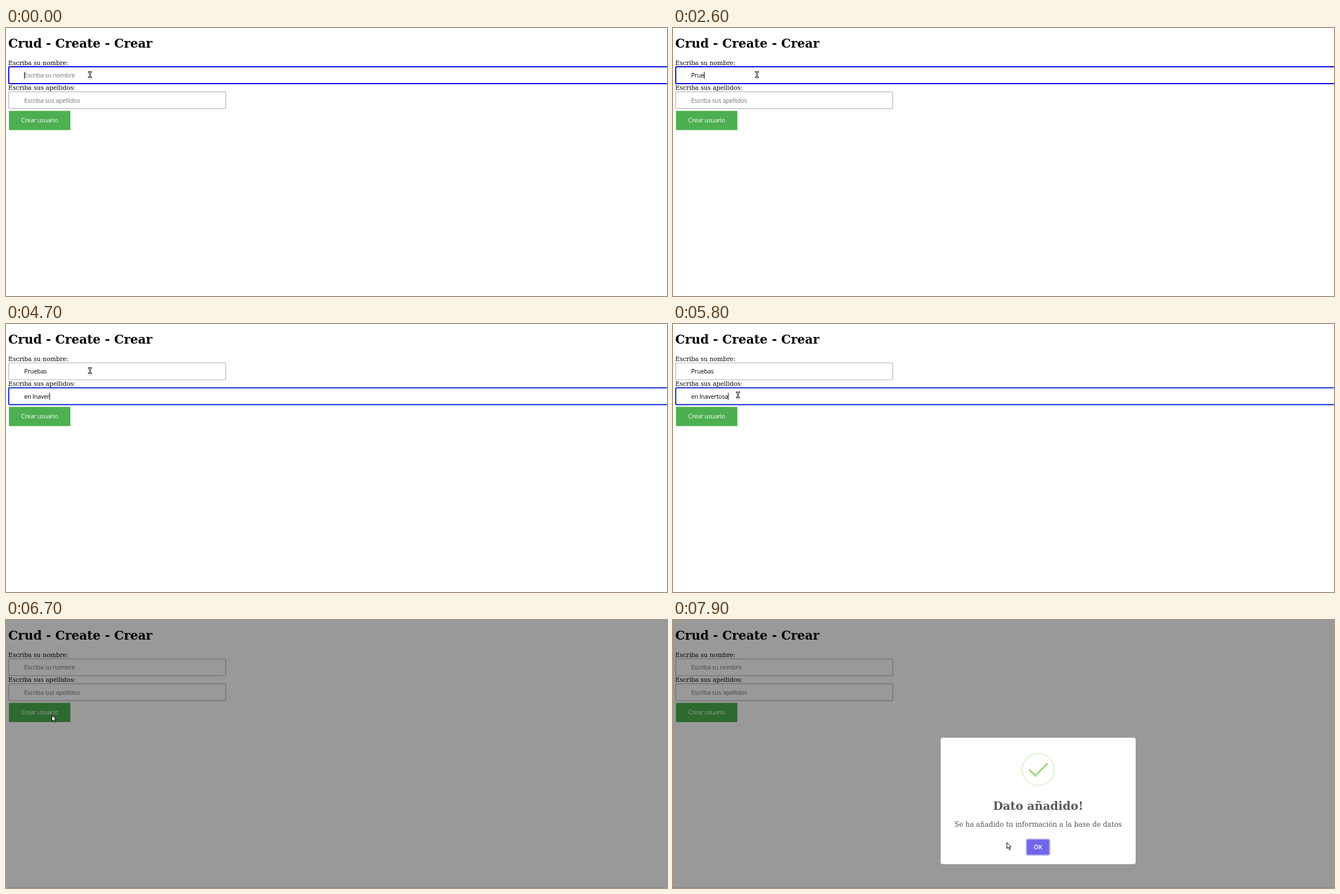
Write an HTML page that moves like this. It is 1173x477 px and loops after 8 s.

```html
<!DOCTYPE html>
<html lang="es">
<head>
<meta charset="utf-8">
<title>Crud - Create - Crear</title>
<style>
  html, body { margin: 0; width: 100%; height: 100%; overflow: hidden; background: #fff; }
  svg { display: block; width: 100vw; height: 100vh; }
  text { font: 10.83px "DejaVu Serif", serif; white-space: pre; }
  .ui { font-family: "Open Sans", "Noto Sans", sans-serif; letter-spacing: -.24px; }
  .mid { text-anchor: middle; }
  #popup { filter: drop-shadow(0 1.5px 1.5px rgba(0, 0, 0, .55)); }
  #popup text { font: 8.4px "DejaVu Sans", sans-serif; }
</style>
</head>
<body>
<svg viewBox="0 0 1173 477">
  <rect width="1173" height="477" fill="#fff"/>
  <text x="4" y="35" style="font-size:21.67px;font-weight:bold">Crud - Create - Crear</text>
  <text x="4" y="65.6">Escriba su nombre:</text>
  <text x="4" y="110.2">Escriba sus apellidos:</text>
  <g id="fields"></g>
  <rect id="button"/>
  <text class="ui" x="27" y="168" fill="#fff">Crear usuario</text>
  <g id="popup">
    <rect x="4.5" y="100" width="1300" height="15" fill="#fff" stroke="#c4c4c4" stroke-width=".7"/>
    <text x="8.6" y="110.6">Perulo</text>
  </g>
  <g id="shade">
    <rect width="1173" height="477" opacity=".4"/>
    <rect y="476" width="1173" height="1" opacity=".1"/>
  </g>
  <g id="modal">
    <rect x="475" y="209.5" width="346" height="225" rx="3.4" fill="#fff"/>
    <circle cx="648" cy="266" r="28.5" fill="none" stroke="#e4f5db" stroke-width="2.7"/>
    <g fill="none" stroke="#a5dc86" stroke-width="3.4" stroke-linecap="round">
      <path id="tip"/>
      <path id="long"/>
    </g>
    <text class="mid" x="648" y="338.4" fill="#595959" style="font-size:20.3px;font-weight:bold">Dato añadido!</text>
    <text class="mid" x="648" y="367.6" fill="#545454" style="font-size:12.19px">Se ha añadido tu información a la base de datos</text>
    <rect x="626" y="389" width="43.5" height="30.5" rx="4" fill="#b8b3f0"/>
    <rect x="628" y="391" width="39.5" height="26.5" rx="2.7" fill="#7066e8"/>
    <text class="ui mid" x="648" y="408.2" fill="#fff" style="font-weight:600;letter-spacing:0">OK</text>
  </g>
  <g id="cursor" stroke="#000" stroke-linejoin="round">
    <path id="beam" fill="#fff" stroke-width=".9" d="M-3-5.5h2.4l.6.6.6-.6H3v1.6H1V3.9h2v1.6H.6L0 4.9l-.6.6H-3V3.9h2v-7.8h-2z"/>
    <path id="hand" fill="#fff" stroke-width="1" d="M0 .8Q0-.3 1-.3T2 .8V4.6l4.4.7Q7.6 5.6 7.5 7L6.8 9.6V11.6H1V9.8L-2.6 6.6Q-3 5.2-1.6 5.4L0 6.4z"/>
    <path id="arrow" fill="#fff" stroke-width="1" d="M0 0V10.8L2.5 8.5 4.4 12.9 6.2 12.1 4.3 7.9H7.7z"/>
  </g>
</svg>
<script>
const LOOP = 8000, STEP = 100;
const START = [149, 83], ON_BUTTON = [81.5, 169.5], BY_OK = [592.5, 396];
const NAME_KEYS = [[0, ''], [400, 'p'], [700, 'pr'], [800, 'pre'], [900, 'preu'], [1100, 'pr'],
  [1200, 'p'], [1300, ''], [1400, 'P'], [1700, 'Pr'], [1800, 'Pre'], [1900, 'Preu'], [2200, 'Pre'],
  [2400, 'Pr'], [2600, 'Prue'], [2800, 'Prueb'], [3000, 'Prueba'], [3100, 'Pruebas'], [6700, '']];
const SURNAME = 'en lnavertosa';
const SURNAME_KEYS = [[0, 0], [3700, 1], [3800, 2], [3900, 3], [4000, 4], [4200, 5], [4300, 6],
  [4500, 7], [4600, 8], [4700, 9], [4900, 11], [5100, 13], [6700, 0]];

const $ = id => document.getElementById(id);
const set = (el, attrs) => { for (const k in attrs) el.setAttribute(k, attrs[k]); };
const show = (el, on) => set(el, { visibility: on ? 'visible' : 'hidden' });
const clamp = x => Math.min(1, Math.max(0, x));
const ease = x => (x = clamp(x), x * x * (3 - 2 * x));
const mix = (a, b, p) => a + (b - a) * p;
const during = (t, a, b) => t >= a && t < b;
const latest = (keys, t) => keys.filter(k => k[0] <= t).pop()[1];

function add(tag, attrs) {
  const el = document.createElementNS('http://www.w3.org/2000/svg', tag);
  set(el, attrs);
  return $('fields').appendChild(el);
}

function makeField(y, hint, blue) {
  const box = add('rect', { x: 4.8, y: y - 15, height: 30, rx: 2.2, fill: '#fff' });
  const label = add('text', { class: 'ui', x: 32.3, y: y + 4 });
  const caret = add('rect', { y: y - 6, width: 1, height: 12.5 });
  return (value, focused, grow) => {
    set(box, {
      width: mix(385, 1287, grow),
      stroke: focused ? blue : '#bdbdbd',
      'stroke-width': focused ? 2 : 1.4
    });
    label.textContent = value || hint;
    set(label, { fill: value ? '#000' : '#757575' });
    set(caret, { x: 32.3 + (value ? label.getComputedTextLength() : 0) });
    show(caret, focused);
  };
}

const nameField = makeField(84.1, 'Escriba su nombre', '#0000e6');
const surnameField = makeField(128.5, 'Escriba sus apellidos', '#0a24dc');

function drawCursor(t) {
  const p = t < 7200 ? ease((t - 5400) / 800) : ease((t - 7200) / 700);
  const [from, to] = t < 7200 ? [START, ON_BUTTON] : [ON_BUTTON, BY_OK];
  const x = mix(from[0], to[0], p), y = mix(from[1], to[1], p);
  const hover = t < 6700 && y > 147.5;
  set($('cursor'), { transform: `translate(${x} ${y})` });
  show($('beam'), t < 6700 && !hover);
  show($('hand'), hover);
  show($('arrow'), t >= 6700);
  return hover;
}

function drawButton(hover, pressed) {
  const pad = pressed ? .6 : 0;
  set($('button'), {
    x: 5.2 - pad, y: 147.5 - pad, width: 109 + 2 * pad, height: 34.2 + 2 * pad,
    rx: pressed ? 2.4 : 0, fill: hover ? '#008cba' : '#4caf50'
  });
}

function drawModal(t) {
  show($('shade'), t >= 6700);
  show($('modal'), t >= 6800);
  const scale = t < 7000 ? 1.03 : t < 7100 ? .97 : 1;
  set($('modal'), { transform: `translate(648 322) scale(${scale}) translate(-648 -322)` });
  const a = clamp((t - 7350) / 150), b = ease((t - 7450) / 300);
  set($('tip'), { d: a ? `M633 267l${10 * a} ${10 * a}` : '' });
  set($('long'), { d: b ? `M643 277l${21 * b} ${-21 * b}` : '' });
}

function draw(t) {
  const grow = ease((t - 3300) / 400), sent = t >= 6700;
  nameField(latest(NAME_KEYS, t), t < 3400, 1 - grow);
  surnameField(SURNAME.slice(0, latest(SURNAME_KEYS, t)), during(t, 3400, 6400), sent ? 0 : grow);
  show($('popup'), during(t, 500, 700) || during(t, 1200, 1300) || during(t, 1600, 1700));
  drawButton(drawCursor(t), during(t, 6400, 6700));
  drawModal(t);
}

const origin = performance.now();
function tick() {
  const t = (performance.now() - origin) % LOOP;
  draw(Math.floor(t / STEP) * STEP);
  requestAnimationFrame(tick);
}
tick();
</script>
</body>
</html>
```
